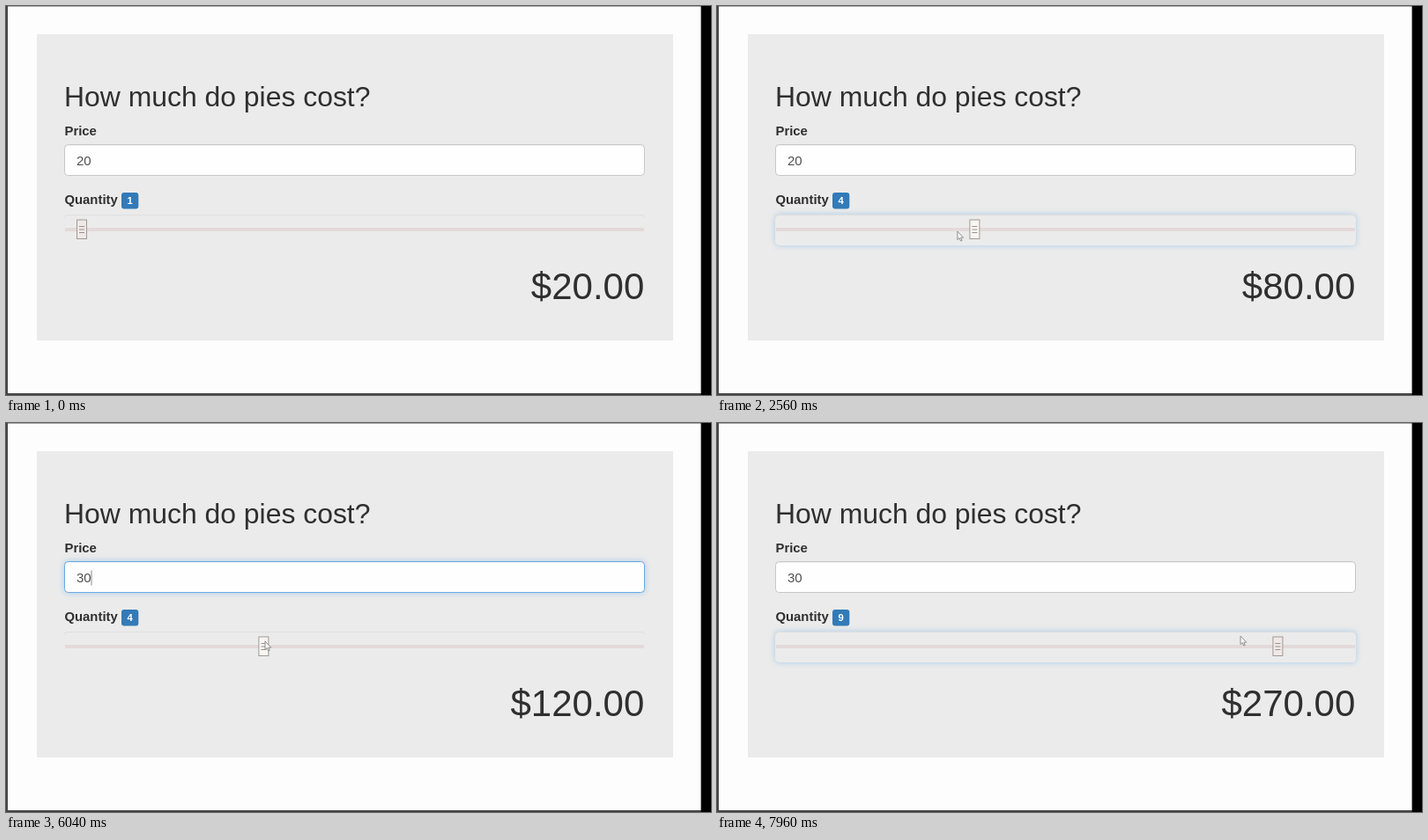
Write an HTML page that moves like this. It is 800 px wide and 442 px high and loops after 8 s.

```html
<!DOCTYPE html>
<html lang="en">
<head>
<meta charset="utf-8">
<title>Pie cost calculator</title>
<style>
html, body { margin: 0; width: 100%; height: 100%; overflow: hidden; background: #fdfdfd; }
#stage { position: absolute; left: 0; top: 0; width: 800px; height: 442px; overflow: hidden; }
#stage > * { position: absolute; box-sizing: border-box; }
#panel { left: 35px; top: 32px; width: 722px; height: 348px; background: #ebebeb; }
.box { left: 66px; width: 659px; border-radius: 4.5px; }
#price { top: 157px; height: 36px; background: #fefefe; border: 1px solid #c6c6c6; }
#range { top: 236.5px; height: 35px; }
svg { left: 0; top: 0; font-family: "Liberation Sans", Arial, sans-serif; fill: #2f2f2f; }
.label { font-size: 14.85px; font-weight: bold; }
</style>
</head>
<body>
<div id="stage">
  <div id="panel"></div>
  <div id="price" class="box"></div>
  <div id="range" class="box"></div>
  <svg width="800" height="442" viewBox="0 0 800 442">
    <rect width="800" height="1" fill="#a4a4a4"/>
    <rect width="2" height="442" fill="#444"/>
    <rect y="440" width="800" height="2" fill="#444"/>
    <rect x="788.6" width="12" height="442" fill="#000"/>

    <text x="66" y="114" font-size="31.9">How much do pies cost?</text>
    <text class="label" x="66.5" y="146.5">Price</text>
    <text class="label" x="66.5" y="225">Quantity</text>
    <rect id="selection" y="167" height="18" fill="#b5d6fc"/>
    <text id="value" x="80" y="181" font-size="15" fill="#505050"></text>
    <rect id="caret" x="96.5" y="167.5" width="1" height="17" fill="#888"/>

    <rect x="131" y="212" width="19.3" height="18.5" rx="3" fill="#337ab7"/>
    <text id="count" x="140.7" y="225.3" font-size="11.25" font-weight="bold" fill="#fff" text-anchor="middle"></text>

    <rect x="67" y="252" width="657" height="4" fill="#e5d9d9"/>
    <g id="handle">
      <rect id="knob" x="-5.5" y="243" width="11" height="21.5" stroke="#a09a95"/>
      <path d="M-3 250.5h6M-3 254h6M-3 257.5h6" stroke="#99918d" fill="none"/>
    </g>

    <text id="total" x="724.3" y="333" font-size="42" text-anchor="end"></text>

    <path id="arrow" d="M0 0V9.6L2.2 7.6L3.7 11L5.2 10.4L3.8 7.2H6.8Z" fill="#f6f6f6" stroke="#858585" stroke-width=".9"/>
    <path id="beam" d="M-2.5 -4.5H2.5M-2.5 4.5H2.5M0 -4.5V4.5" fill="none" stroke="#444" stroke-width="1.1"/>
  </svg>
</div>
<script>
const LOOP = 8000, STEP = 40, NOTCH = 68.8, FIRST = 86, GRIP = 2;
const ENTER = 200, SELECT = 3400, TYPE = 4720;
const DRAG1 = { from: 1600, to: 2720 }, DRAG2 = { from: 6080, to: 7460 };

// Pointer moves, each eased from the place where the last one ended
const MOVES = [
  { from: ENTER, to: 1000, x: 86, y: 246 },
  { from: 1040, to: 1320, x: 90, y: 256 },
  { from: DRAG1.from, to: DRAG1.to, x: 275, y: 256 },
  { from: 2740, to: 3280, x: 97, y: 176 },
  { from: SELECT, to: 3960, x: 66, y: 176 },
  { from: 5240, to: 5840, x: 303, y: 263 },
  { from: 5840, to: 6040, x: 294, y: 248 },
  { from: DRAG2.from, to: 7140, x: 609, y: 255 },
  { from: 7720, to: 7960, x: 594, y: 242 }
];

const el = {};
document.querySelectorAll("[id]").forEach(e => el[e.id] = e);
const clamp = (v, lo, hi) => Math.min(hi, Math.max(lo, v));
const show = (e, on) => e.setAttribute("visibility", on ? "visible" : "hidden");
const place = (e, x, y) => e.setAttribute("transform", `translate(${x} ${y})`);
const during = (t, span) => t >= span.from && t < span.to;
const ease = k => k < 0.5 ? 4 * k ** 3 : 1 - 4 * (1 - k) ** 3;

function pointer(t) {
  let x = 206, y = -12;
  for (const m of MOVES) {
    const k = ease(clamp((t - m.from) / (m.to - m.from), 0, 1));
    x += (m.x - x) * k;
    y += (m.y - y) * k;
  }
  return { x, y };
}

// The slider follows the pointer one step late, and only while held.
function quantity(t) {
  const late = t - STEP;
  const drag = late < DRAG2.from ? DRAG1 : DRAG2;
  const { x } = pointer(clamp(late, drag.from, drag.to));
  return Math.round((x - FIRST - GRIP) / NOTCH) + 1;
}

// Focus strength with a 150 ms fade at both ends
const focus = (t, from, to) => clamp((t - from) / 150, 0, 1) * clamp(1 - (t - to) / 150, 0, 1);
const glow = k => `inset 0 1px 1px rgba(0,0,0,.06), 0 0 6px rgba(102,175,233,${0.5 * k})`;

function draw(t) {
  const { x, y } = pointer(t);
  const count = quantity(t), price = t < TYPE ? 20 : 30;
  const knobX = FIRST + (count - 1) * NOTCH;

  el.value.textContent = price;
  el.count.textContent = count;
  el.total.textContent = "$" + (price * count).toFixed(2);

  const held = during(t, DRAG1) || during(t, DRAG2);
  const over = t >= ENTER && Math.abs(x - knobX) < 6 && y > 242 && y < 265;
  place(el.handle, knobX, 0);
  el.knob.setAttribute("fill", held || over ? "#f8f6f3" : "#efe8e6");

  const typing = focus(t, SELECT, DRAG2.from);
  const sliding = Math.max(focus(t, DRAG1.from, SELECT), focus(t, DRAG2.from, LOOP));
  const mix = (a, b) => Math.round(a + (b - a) * typing);
  el.price.style.borderColor = `rgb(${mix(198, 102)},${mix(198, 170)},${mix(198, 228)})`;
  el.price.style.boxShadow = glow(typing);
  el.range.style.boxShadow = glow(sliding);

  const left = clamp(x, 80, 97);
  show(el.selection, t >= SELECT && t < TYPE);
  el.selection.setAttribute("x", left);
  el.selection.setAttribute("width", 97 - left);
  show(el.caret, t >= TYPE && t < DRAG2.from);

  const inField = x >= 65 && x < 725 && y > 157 && y < 193;
  show(el.arrow, t >= ENTER && !inField);
  show(el.beam, t >= ENTER && inField);
  place(el.arrow, x, y);
  place(el.beam, x, y);
}

const start = performance.now();
function tick() {
  const t = (performance.now() - start) % LOOP;
  draw(Math.floor(t / STEP) * STEP);
  requestAnimationFrame(tick);
}
draw(0);
requestAnimationFrame(tick);
</script>
</body>
</html>
```
